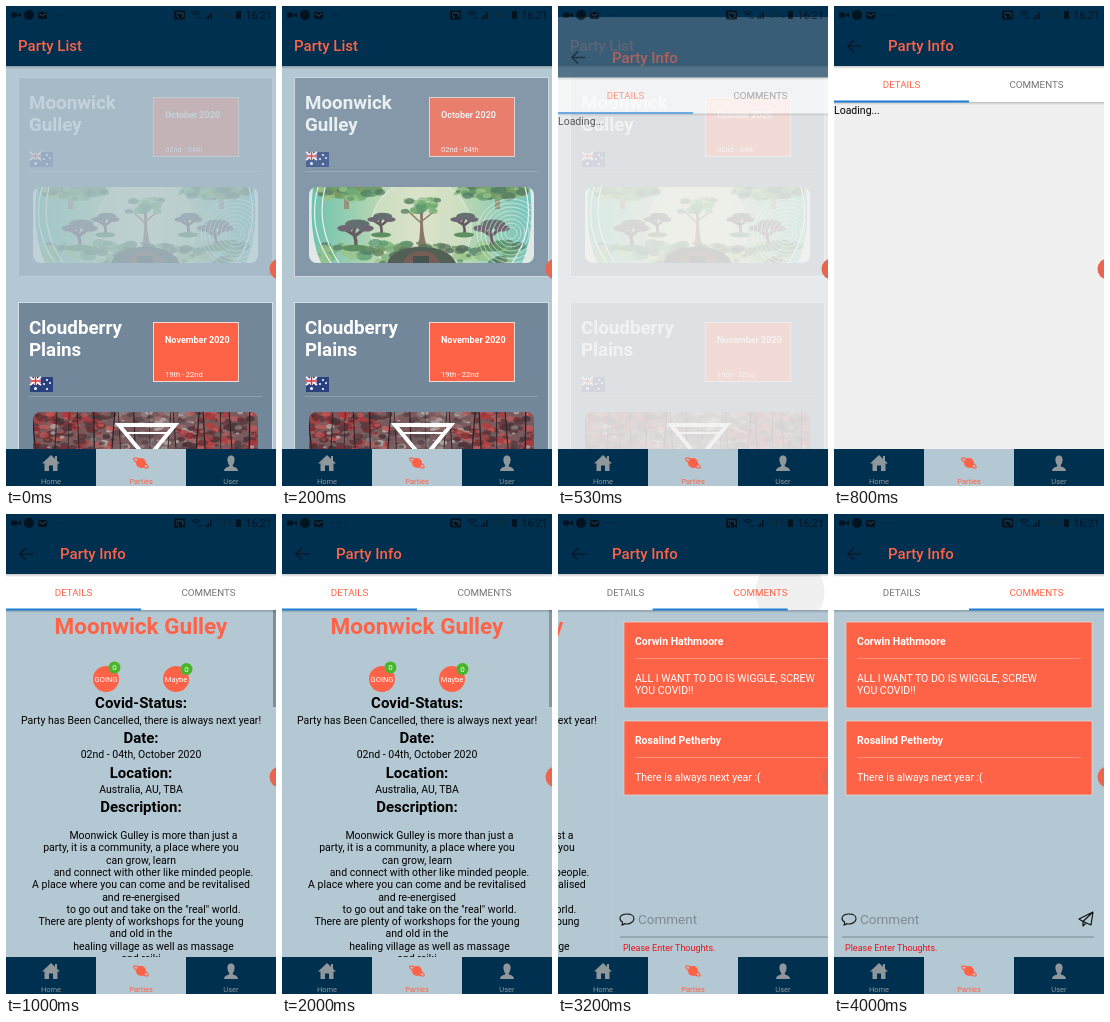
Recreate the animation shown at these times as an HTML page. Size 270 by 480 pixels, loop 4140 ms.

```html
<!DOCTYPE html>
<html lang="en">
<head>
<meta charset="utf-8">
<title>Party list</title>
<style>
html, body { margin: 0; width: 100%; height: 100%; overflow: hidden; background: #b4c8d3; }
svg { display: block; width: 100vw; height: 100vh; font-family: Roboto, sans-serif; }
text { white-space: pre; }
#info > * { opacity: var(--shown); }
</style>
</head>
<body>
<svg id="stage" viewBox="0 0 270 480" preserveAspectRatio="none"></svg>
<script>
const LOOP = 4140, STEP = 200 / 3;
const NAVY = '#003050', SKY = '#b4c8d3', TOMATO = '#ff6347', GREY = '#757575';
const FIRST = ['Moonwick', 'Gulley'], SECOND = ['Cloudberry', 'Plains'];

// Markup helpers; text y is the middle of the capitals.
const rect = (x, y, w, h, fill, more = '') =>
  `<rect x="${x}" y="${y}" width="${w}" height="${h}" fill="${fill}" ${more}/>`;
const circle = (x, y, r, fill, more = '') => `<circle cx="${x}" cy="${y}" r="${r}" fill="${fill}" ${more}/>`;
const oval = (x, y, rx, ry, fill, more = '') =>
  `<ellipse cx="${x}" cy="${y}" rx="${rx}" ry="${ry}" fill="${fill}" ${more}/>`;
const path = (d, fill, more = '') => `<path d="${d}" fill="${fill}" ${more}/>`;
const line = (d, stroke, width = 1, more = '') =>
  path(d, 'none', `stroke="${stroke}" stroke-width="${width}" ${more}`);
const text = (s, x, y, size, fill, more = '') =>
  `<text x="${x}" y="${y + size * 0.355}" font-size="${size}" fill="${fill}" ${more}>${s}</text>`;
const mid = (s, x, y, size, fill, more = '') => text(s, x, y, size, fill, 'text-anchor="middle" ' + more);
const group = (inner, more = '') => `<g ${more}>${inner}</g>`;
const at = (x, y, inner) => group(inner, `transform="translate(${x} ${y})"`);
const BOLD = 'font-weight="700"', MEDIUM = 'font-weight="500"';

function randomizer(seed) {
  return () => (seed = (seed * 16807) % 2147483647) / 2147483647;
}

function blobs(seed, count, x, y, w, h, size, colours) {
  const rnd = randomizer(seed);
  let out = '';
  for (let i = 0; i < count; i++) {
    const r = size * (0.4 + rnd());
    out += oval((x + rnd() * w).toFixed(1), (y + rnd() * h).toFixed(1), r.toFixed(1), (r * 0.6).toFixed(1),
      colours[Math.floor(rnd() * colours.length)], 'opacity=".75"');
  }
  return out;
}

const bonsai = (x, y, s) => group(
  line('M0 20C4 12-6 8 2 0M0 10L9 3M-1 9L-9 4', '#4a3338', 3) +
  oval(2, -1, 11, 4, '#47504a') + oval(10, 3, 7, 3, '#54434f') + oval(-9, 3, 7, 3, '#54434f') +
  oval(0, 21, 12, 3, '#3f7a38'), `transform="translate(${x} ${y}) scale(${s})"`);

function valleyArt() {
  const leaves = ['#3c8a4a', '#5ea653', '#8fc26a', '#2f5f3a'];
  let rings = '';
  for (let r = 6; r < 36; r += 4) rings += circle(202, 46, r, 'none', 'stroke="#fff" stroke-opacity=".6"');
  return rect(0, 0, 225, 76, 'url(#glade)') +
    circle(112, 42, 50, '#eceec8', 'opacity=".55" stroke="#fff" stroke-width="1.5"') +
    blobs(7, 70, 10, 56, 205, 20, 6, leaves) +
    oval(40, 3, 34, 9, '#5f8a3e') + rect(35, 8, 5, 14, '#8a8058') +
    oval(186, 3, 34, 9, '#5f8a3e') + rect(186, 8, 5, 14, '#8a8058') +
    blobs(23, 30, 10, 0, 68, 12, 5, leaves) + blobs(29, 30, 147, 0, 68, 12, 5, leaves) +
    bonsai(46, 38, 1.1) + bonsai(72, 30, 0.85) + bonsai(155, 30, 0.85) + bonsai(182, 38, 1.1) +
    path('M109 60Q112 45 111 26L114 26Q113 45 118 60Z', '#7a5a40') +
    line('M112 36L99 24M113 34L127 23', '#7a5a40', 1.5) +
    blobs(11, 34, 95, 12, 36, 13, 4, leaves) +
    blobs(31, 26, 62, 58, 100, 12, 5, ['#27422b', '#3d5c30', '#57803c']) +
    path('M78 76Q84 60 112 60Q140 60 147 76Z', '#2f3a28') +
    path('M94 76Q98 64 112 64Q126 64 131 76Z', '#5f3626') + rect(104, 69, 16, 7, '#1f2820') +
    rings + line('M9 0Q-2 42 22 76M16 0Q6 40 30 76M216 0Q227 42 203 76', '#fff', 1.2) +
    path('M0 0H4Q-1 48 12 76H0ZM225 0H221Q226 48 213 76H225Z', '#f3f6ee');
}

function forestArt() {
  const reds = ['#b23a3c', '#7a2c30', '#c25a58', '#54343a', '#3f3034'];
  const fog = ['#8d8484', '#b9b0ae', '#6b5e60', '#544448', '#9a6a6a'];
  const rnd = randomizer(5);
  let trunks = '';
  for (let x = 6; x < 225; x += 14) {
    trunks += line(`M${x} 76L${(x + rnd() * 14 - 7).toFixed(1)} 0`, '#2c2226', (0.6 + rnd()).toFixed(1));
  }
  return rect(0, 0, 225, 76, '#7a5a5c') +
    blobs(41, 150, 55, 0, 115, 48, 4, fog) +
    blobs(43, 150, 0, 0, 80, 48, 4, reds) + blobs(47, 150, 145, 0, 80, 48, 4, reds) +
    blobs(53, 70, 0, 0, 225, 40, 3, fog) + trunks +
    line('M86 13H142L114 47Z', '#fff', 4) + line('M93 21H135', '#fff', 2);
}

const flag = rect(0, 0, 23, 15, '#2a4180') +
  line('M0 0L11 8M11 0L0 8', '#fff', 1.8) + line('M5.5 0V8M0 4H11', '#fff', 3) +
  line('M5.5 0V8M0 4H11', '#d8323a', 1.5) +
  circle(5.5, 11.5, 1.5, '#fff') + circle(17, 3, 1, '#fff') + circle(14, 7, 1, '#fff') +
  circle(20, 6, 1, '#fff') + circle(17, 12, 1.1, '#fff');

function partyCard(name, month, days, art) {
  return rect(12.5, -0.5, 254, 199, '#73879b', 'stroke="#d5dee2"') +
    name.map((s, i) => text(s, 23, 24.7 + i * 22, 18.75, '#fff', BOLD)).join('') +
    at(24, 74, flag) +
    rect(147.5, 19.5, 85, 59, TOMATO, 'stroke="#e8dcd6"') +
    text(month, 159, 37.2, 9, '#fff', BOLD) + text(days, 159, 71.7, 7.5, '#fff') +
    line('M23 93.5H256', '#8f9fae') +
    at(27, 109, group(art, 'clip-path="url(#photo)"'));
}

const header = (title, x) => rect(0, 0, 270, 60, NAVY) +
  rect(0, 60, 270, 3, 'url(#shade)') + text(title, x, 40, 15, TOMATO, MEDIUM);

const listScreen = rect(0, 0, 270, 480, SKY) +
  at(0, 72, group(partyCard(FIRST, 'October 2020', '02nd - 04th', valleyArt()), 'id="pressed"')) +
  at(0, 297, partyCard(SECOND, 'November 2020', '19th - 22nd', forestArt())) +
  header('Party List', 12);

const badge = (label, x, bx, by) => circle(x, 165, 13, TOMATO) + mid(label, x, 165.5, 7.5, '#fff') +
  circle(bx, by, 6, '#48b52a') + mid('0', bx, by, 8, '#fff');

const facts = [
  ['Covid-Status:', 'Party has Been Cancelled, there is always next year!'],
  ['Date:', '02nd - 04th, October 2020'],
  ['Location:', 'Australia, AU, TBA'],
  ['Description:', '']
];
// A leading space marks an indented line.
const story = [
  ` ${FIRST.join(' ')} is more than just a`, 'party, it is a community, a place where you', 'can grow, learn',
  ' and connect with other like minded people.', 'A place where you can come and be revitalised',
  'and re-energised', ' to go out and take on the "real" world.', 'There are plenty of workshops for the young',
  'and old in the', ' healing village as well as massage', 'and reiki'
];

const detailsPage = rect(0, 96, 270, 384, SKY) +
  mid(FIRST.join(' '), 135, 112.5, 22.5, TOMATO, BOLD) +
  badge('GOING', 100, 108.5, 153.5) + badge('Maybe', 170, 180.5, 155) +
  facts.map(([head, body], i) => mid(head, 135, 189 + i * 34.7, 15, '#000', BOLD) +
    mid(body, 135, 206 + i * 34.5, 10.5, '#000')).join('') +
  story.map((s, i) => mid(s.trim(), s[0] === ' ' ? 147.5 : 135, 321.5 + i * 12.27, 10.5, '#000')).join('') +
  rect(267, 96, 3, 97, '#7f8e97', 'id="scrollbar"');

const comment = (y, h, name, lines) => rect(12, y, 246, h, TOMATO, 'stroke="#e3d3cf" stroke-width=".8"') +
  text(name, 23, y + 19, 10.5, '#fff', BOLD) + line(`M23 ${y + 36.5}H247`, '#f0907e') +
  lines.map((s, i) => text(s, 23, y + 56 + i * 12.4, 10.5, '#fff')).join('');

const commentsPage = rect(0, 96, 270, 384, SKY) +
  comment(108, 86, 'Corwin Hathmoore', ['ALL I WANT TO DO IS WIGGLE, SCREW', 'YOU COVID!!']) +
  comment(207, 74, 'Rosalind Petherby', ['There is always next year :(']) +
  line('M10 411Q11 409 10.5 408C6 405 8 400 15 400S22 403 22 405S19 410 15 410Q13 410 12.5 409.6Q11.5 411 10 411Z', '#111', 1.1) +
  text('Comment', 26, 405.5, 13.5, '#7f8b92') +
  line('M259 398L245 405L249 407.5L257 411ZM259 398L249 407.5V412L252 409', '#111', 1.2, 'stroke-linejoin="round"') +
  line('M8 423H260', '#7d8990') + text('Please Enter Thoughts.', 11, 434, 9, '#e8121a');

// The screen and its body each have a background, so the body fades in denser than the header.
const infoScreen = rect(0, 0, 270, 480, '#f0f0f0') + rect(0, 60, 270, 420, '#f0f0f0') +
  text('Loading...', 0, 104, 10.5, '#000') +
  group(group(detailsPage, 'id="details"') + group(commentsPage, 'id="comments"'), 'id="pages"') +
  rect(0, 96, 270, 3, 'url(#shade)') + rect(0, 60, 270, 36, '#fff') +
  group(circle(232, 78, 10, '#000', 'id="ripple"'), 'clip-path="url(#tab)"') +
  mid('DETAILS', 67.5, 78.5, 9.75, TOMATO, 'id="detailsTab"') +
  mid('COMMENTS', 202.5, 78.5, 9.75, GREY, 'id="commentsTab"') +
  rect(0, 94.5, 135, 2, '#1f7fd6', 'id="marker"') +
  header('Party Info', 54) + line('M27 40H14M20 34L14 40L20 46', '#0a1a28', 1.6);

const statusBar = group(
  rect(5, 6.5, 6, 5, '#000', 'rx="1"') + path('M11 9L15 6.5V11.5Z', '#000') + circle(23, 9, 5, '#000') +
  rect(32, 6, 9, 7, '#000', 'rx="1"') + line('M33 7.5L36.5 10L40 7.5', '#41566a') +
  [50, 54, 58].map(x => circle(x, 9, 0.7, '#000')).join('') +
  rect(168, 4.5, 11, 9, '#000', 'rx="1"') + line('M170 7H177V11M170 9L173 12', '#41566a') +
  line('M186 7Q190 4 194 7M187.5 9Q190 7 192.5 9M190 11V12', '#000', 1.2) + line('M192 12L196 12', '#000') +
  path('M199 13V11H200.5V13ZM201.5 13V9H203V13ZM204 13V6H205.5V13Z', '#000') +
  text('51%', 211, 9, 8.5, '#1c2620') + rect(230, 5, 5, 8, '#000', 'rx="1"') +
  text('16:21', 239.5, 9, 10.5, '#000'), 'opacity=".6"');

const idle = '#8f979b';
const tabBar = rect(0, 443, 270, 37, NAVY) + rect(90, 443, 90, 37, SKY) +
  path('M45 449L54 457.5H51.5V465H47V459.5H43V465H38.5V457.5H36ZM49 450H51V455L49 453Z', idle) +
  path('M225 449.5C222 449.5 221 452 221.5 455Q222 458 223.3 459L223 460.5Q218 461.5 218 465H232Q232 461.5 227 460.5L226.7 459Q228 458 228.5 455C229 452 228 449.5 225 449.5Z', idle) +
  mid('Home', 45, 475.3, 7.5, idle) + mid('User', 225, 475.3, 7.5, idle) +
  circle(135, 457, 5, TOMATO) +
  group(oval(0, 0, 8.5, 2.2, 'none', `stroke="${TOMATO}" stroke-width="1.3"`), 'transform="translate(135 457) rotate(32)"') +
  mid('Parties', 135, 475.3, 7.5, TOMATO);

const $ = id => document.getElementById(id);
$('stage').innerHTML = `<defs>
  <linearGradient id="glade"><stop stop-color="#4fc0a4"/><stop offset=".3" stop-color="#b9dca6"/><stop offset=".5" stop-color="#e9ecc4"/><stop offset=".7" stop-color="#b9dca6"/><stop offset="1" stop-color="#58c2b4"/></linearGradient>
  <linearGradient id="shade" x2="0" y2="1"><stop stop-opacity=".22"/><stop offset="1" stop-opacity="0"/></linearGradient>
  <clipPath id="photo">${rect(0, 0, 225, 76, '#000', 'rx="8"')}</clipPath>
  <clipPath id="tab">${rect(135, 60, 135, 36, '#000')}</clipPath></defs>` +
  group(listScreen, 'id="list"') + group(infoScreen, 'id="info"') + tabBar + statusBar +
  circle(274, 263, 10.5, '#e8664f');

const set = (id, name, value) => $(id).setAttribute(name, value);
const clamp = v => Math.min(1, Math.max(0, v));
const part = (t, from, to) => clamp((t - from) / (to - from));
const easeOut = (u, power) => 1 - (1 - u) ** power;
const smooth = u => u * u * (3 - 2 * u);

function draw(t) {
  set('pressed', 'opacity', 0.2 + 0.8 * smooth(part(t, 0, 330)));

  // The info screen fades in while rising.
  const enter = part(t, 430, 650);
  $('info').style.setProperty('--shown', easeOut(enter, 1.5));
  set('info', 'transform', `translate(0 ${36 * (1 - enter) ** 1.8})`);
  set('info', 'visibility', enter > 0 ? 'visible' : 'hidden');

  set('pages', 'visibility', t > 900 ? 'inherit' : 'hidden');
  set('scrollbar', 'opacity', 1 - part(t, 1960, 2260));

  // Tab change: pages slide ahead of the marker.
  const slide = part(t, 3050, 3411);
  const page = easeOut(slide, 3);
  set('details', 'transform', `translate(${-270 * page} 0)`);
  set('comments', 'transform', `translate(${270 * (1 - page)} 0)`);
  set('marker', 'x', 135 * easeOut(slide, 2.25));
  set('detailsTab', 'fill', page > 0.3 ? GREY : TOMATO);
  set('commentsTab', 'fill', page > 0.3 ? TOMATO : t > 2860 ? '#6c6c6c' : GREY);
  set('ripple', 'r', 10 + 90 * part(t, 3050, 3600));
  set('ripple', 'opacity', t < 3050 ? 0 : 0.06 * (1 - part(t, 3250, 3700)));
}

function tick(now) {
  const t = now % LOOP;
  draw(Math.floor((t + 4) / STEP) * STEP);
  requestAnimationFrame(tick);
}
draw(0);
requestAnimationFrame(tick);
</script>
</body>
</html>
```
